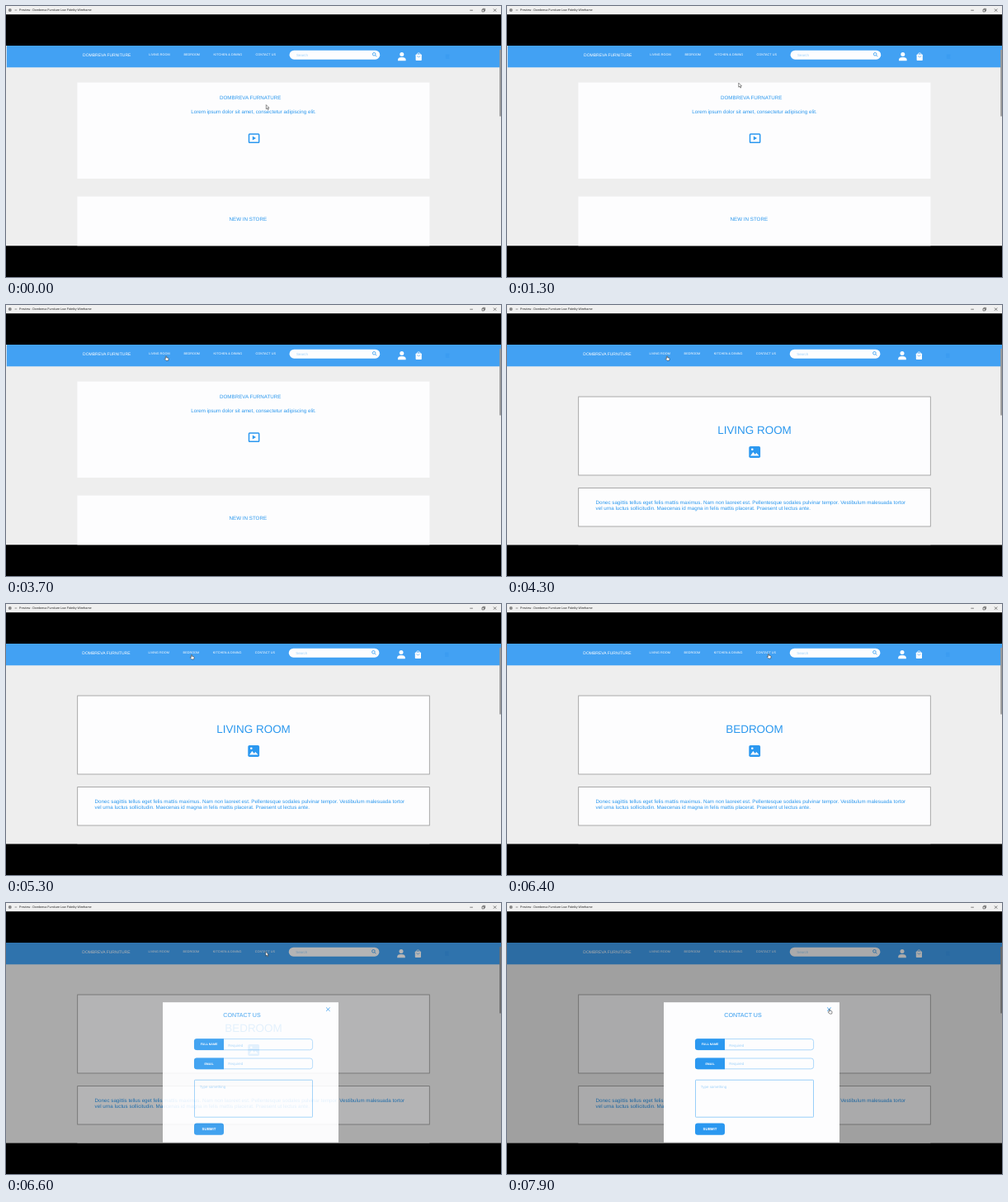
These frames come from a looping animation (600x328 px, 8 s). An HTML page:

```html
<!DOCTYPE html>
<html lang="en">
<head>
<meta charset="utf-8">
<title>Wireframe preview</title>
<style>
  html, body { margin: 0; width: 100%; height: 100%; overflow: hidden; background: #000; }
  svg { display: block; width: 600px; height: 328px; }
  text {
    font-family: "Liberation Sans", Arial, sans-serif;
    fill: #2b98ee;
    text-rendering: geometricPrecision;
  }
  .mid { text-anchor: middle; }
  .white { fill: #fff; }
  .bold { font-weight: bold; fill: #fff; text-anchor: middle; }
  .hint { fill: #9fd2fb; font-size: 4.45px; }
  .body { font-size: 6.22px; }
  .title { font-size: 13.45px; text-anchor: middle; }
  .nav { font-size: 3.8px; fill: #fff; }
  .card { fill: #fdfdfe; }
  .framed { fill: #fdfdfe; stroke: #969696; stroke-width: .8; }
  .field { fill: #fdfdfe; stroke: #98cff9; stroke-width: .8; }
  .blue { fill: #2b98f0; }
</style>
</head>
<body>
<svg viewBox="0 0 600 328">
  <defs>
    <clipPath id="view"><rect y="48" width="600" height="242.3"/></clipPath>

    <g id="header">
      <rect y="48" width="600" height="26.3" fill="#42a1f3"/>
      <text class="white" x="92.3" y="60.9" font-size="5">DOMBREVA FURNITURE</text>
      <text class="nav" x="172.5" y="60.2">LIVING ROOM</text>
      <text class="nav" x="214.6" y="60.2">BEDROOM</text>
      <text class="nav" x="250.8" y="60.2">KITCHEN &amp; DINING</text>
      <text class="nav" x="301.8" y="60.2">CONTACT US</text>
      <rect x="342.8" y="53.7" width="109.6" height="11" rx="5.5" fill="#fdfdfe"/>
      <text class="hint" x="351.2" y="60.9">Search</text>
      <g fill="none" stroke="#2b98f0" stroke-width=".8">
        <circle cx="445.4" cy="58.3" r="1.8"/>
        <path d="M446.7 59.6l1.7 1.7"/>
      </g>
      <g class="white">
        <circle cx="479" cy="58.6" r="2.5"/>
        <path d="M474.2 66.3v-1.3q0-2.9 4.8-2.9t4.8 2.9v1.3z"/>
        <rect x="495.8" y="58.5" width="7.2" height="7.6" rx=".8"/>
      </g>
      <path d="M497.6 59v-.4a1.8 1.8 0 0 1 3.6 0v.4" fill="none" stroke="#fff" stroke-width=".8"/>
      <path d="M497.7 60.2a1.7 1.7 0 0 0 3.4 0" fill="none" stroke="#42a1f3" stroke-width=".6"/>
      <path d="M532 59.3h4.6M532 61.2h4.6M532 63.1h4.6" stroke="#2f94ec" stroke-width=".6"/>
    </g>

    <g id="photo">
      <rect class="blue" x="293.3" y="171" width="13.8" height="14" rx="1.8"/>
      <path d="M295 182.6l3.4-4.5 2.3 2.8 1.6-2 3.3 3.7z" fill="#fdfdfe"/>
      <circle cx="297.3" cy="174.8" r="1.3" fill="#fdfdfe"/>
    </g>
  </defs>

  <rect width="600" height="328"/>
  <rect width="600" height="10.2" fill="#f0f0f0"/>
  <circle cx="4.8" cy="5" r="2" fill="#888"/>
  <path d="M10.6 5h2.6" stroke="#555" stroke-width=".6"/>
  <text x="16" y="6.4" font-size="3.7" style="fill:#222">Preview : Dombreva Furniture Low Fidelity Wireframe</text>
  <g fill="none" stroke="#333" stroke-width=".6">
    <path d="M562.3 5.2h3.6M590.9 3.4l3.4 3.4M594.3 3.4l-3.4 3.4"/>
    <path d="M577 4.3h2.6v2.6h-2.6zM578 4.2v-.9h2.6v2.6h-.9"/>
  </g>

  <g clip-path="url(#view)">
    <rect y="48" width="600" height="243" fill="#eee"/>

    <g id="home" transform="translate(.8 0)">
      <use href="#header"/>
      <rect class="card" x="85.6" y="92.6" width="427" height="116.4"/>
      <rect class="card" x="85.6" y="230.6" width="427" height="62"/>
      <text class="body mid" x="295.4" y="113.2">DOMBREVA FURNATURE</text>
      <text class="body mid" x="299.2" y="130.3">Lorem ipsum dolor sit amet, consectetur adipiscing elit.</text>
      <rect x="293.7" y="154.9" width="12.2" height="10.4" rx=".8" fill="none" stroke="#2b98f0" stroke-width="1.5"/>
      <path class="blue" d="M298 157.6v5l4.2-2.5z"/>
      <text class="body mid" x="292.5" y="260.3">NEW IN STORE</text>
    </g>

    <g id="room">
      <rect y="48" width="600" height="243" fill="#eee"/>
      <use href="#header"/>
      <rect class="framed" x="86.7" y="111" width="426.6" height="95"/>
      <rect class="framed" x="86.7" y="221.6" width="426.6" height="46.4"/>
      <text id="living" class="title" x="300" y="155.6">LIVING ROOM</text>
      <text id="bedroom" class="title" x="300" y="155.6">BEDROOM</text>
      <use href="#photo"/>
      <text class="body" x="107.6" y="241.1">Donec sagittis tellus eget felis mattis maximus. Nam non laoreet est. Pellentesque sodales pulvinar tempor. Vestibulum malesuada tortor</text>
      <text class="body" x="107.6" y="248.3">vel urna luctus sollicitudin. Maecenas id magna in felis mattis placerat. Praesent ut lectus ante.</text>
    </g>

    <rect x="598.2" y="53" width="1.8" height="80.5" fill="#9a9a9a"/>

    <g id="modal">
      <rect y="48" width="600" height="243" fill="#000" opacity=".33"/>
      <rect x="190" y="120.2" width="213" height="169.5" fill="#fdfdfe"/>
      <text class="mid" x="286" y="137.6" font-size="7.1">CONTACT US</text>
      <path d="M388.2 126.5l4.4 4.4M392.6 126.5l-4.4 4.4" stroke="#2b98f0" stroke-width=".9"/>
      <rect class="field" x="228.4" y="164.6" width="143.2" height="13.2" rx="3"/>
      <path class="blue" d="M264 164.3v13.8h-33q-3-.1-3-3v-7.8q0-3 3-3z"/>
      <text class="bold" x="246" y="172.4" font-size="3.6">FULL NAME</text>
      <text class="hint" x="269.3" y="173.7">Required</text>
      <rect class="field" x="228.4" y="188" width="143.2" height="12.8" rx="3"/>
      <path class="blue" d="M264 187.6v13.6h-33q-3-.1-3-3v-7.6q0-3 3-3z"/>
      <text class="bold" x="246" y="195.6" font-size="3.6">EMAIL</text>
      <text class="hint" x="269.3" y="196.3">Required</text>
      <rect class="field" x="228.5" y="214.2" width="143" height="45" rx=".6" style="stroke:#7fc3f8"/>
      <text class="hint" x="234.8" y="224">Type something</text>
      <rect class="blue" x="228" y="266.5" width="36" height="14.2" rx="3.2"/>
      <text class="bold" x="246" y="275.3" font-size="4.43">SUBMIT</text>
    </g>
  </g>

  <g id="cursor" fill="#fff" stroke="#222" stroke-width=".5" stroke-linejoin="round">
    <path id="arrow" d="M0 0v5.1l1.2-1.1.9 2 .9-.4-.9-1.9h1.6z"/>
    <path id="hand" d="M-.6 3.2V.5Q0-.4.6.5V2.1l2 .5q.6.2.5.8l-.4 2.3H0l-1.9-2q.2-.8 1.3-.1z"/>
  </g>
</svg>

<script>
  const LOOP = 8000, TICK = 100;
  const LIVING = 3800, BEDROOM = 5300, CONTACT = 6400;
  const DISSOLVE = [0, .38, .88, 1];

  // Pointer stops: time, x, y
  const PATH = [
    [0, 315.3, 119.6], [300, 315.3, 119.6], [1500, 278, 91], [2600, 254.7, 74.2],
    [3500, 194, 61.6], [4600, 194, 61.6], [5100, 225, 61.2], [5700, 225, 61.2],
    [6400, 317, 60.2], [6500, 314.8, 59], [6800, 314.8, 59],
    [7600, 391, 128.4], [8000, 391, 128.4]
  ];
  // Spans in which the pointer rests on something clickable
  const LINKS = [[3400, 4700], [5000, 5800], [6200, 6500], [7500, 8000]];

  const el = id => document.getElementById(id);
  const fade = (t, start) => {
    const step = Math.floor((t - start) / TICK);
    return DISSOLVE[Math.max(0, Math.min(step, DISSOLVE.length - 1))];
  };
  const ease = u => u * u * (3 - 2 * u);

  function pointer(t) {
    const i = PATH.findIndex(p => p[0] > t);
    const [t0, x0, y0] = PATH[i - 1], [t1, x1, y1] = PATH[i];
    const u = ease((t - t0) / (t1 - t0));
    return [x0 + (x1 - x0) * u, y0 + (y1 - y0) * u];
  }

  function draw(t) {
    const swap = fade(t, BEDROOM);
    el("room").style.opacity = fade(t, LIVING);
    el("living").style.opacity = 1 - swap;
    el("bedroom").style.opacity = swap;
    el("modal").style.opacity = fade(t, CONTACT);

    const onLink = LINKS.some(([a, b]) => t >= a && t < b);
    el("hand").style.display = onLink ? "" : "none";
    el("arrow").style.display = onLink ? "none" : "";
    el("cursor").setAttribute("transform", `translate(${pointer(t)})`);
  }

  const begin = performance.now();
  function frame() {
    const t = (performance.now() - begin) % LOOP;
    draw(Math.floor(t / TICK) * TICK);
    requestAnimationFrame(frame);
  }
  frame();
</script>
</body>
</html>
```
